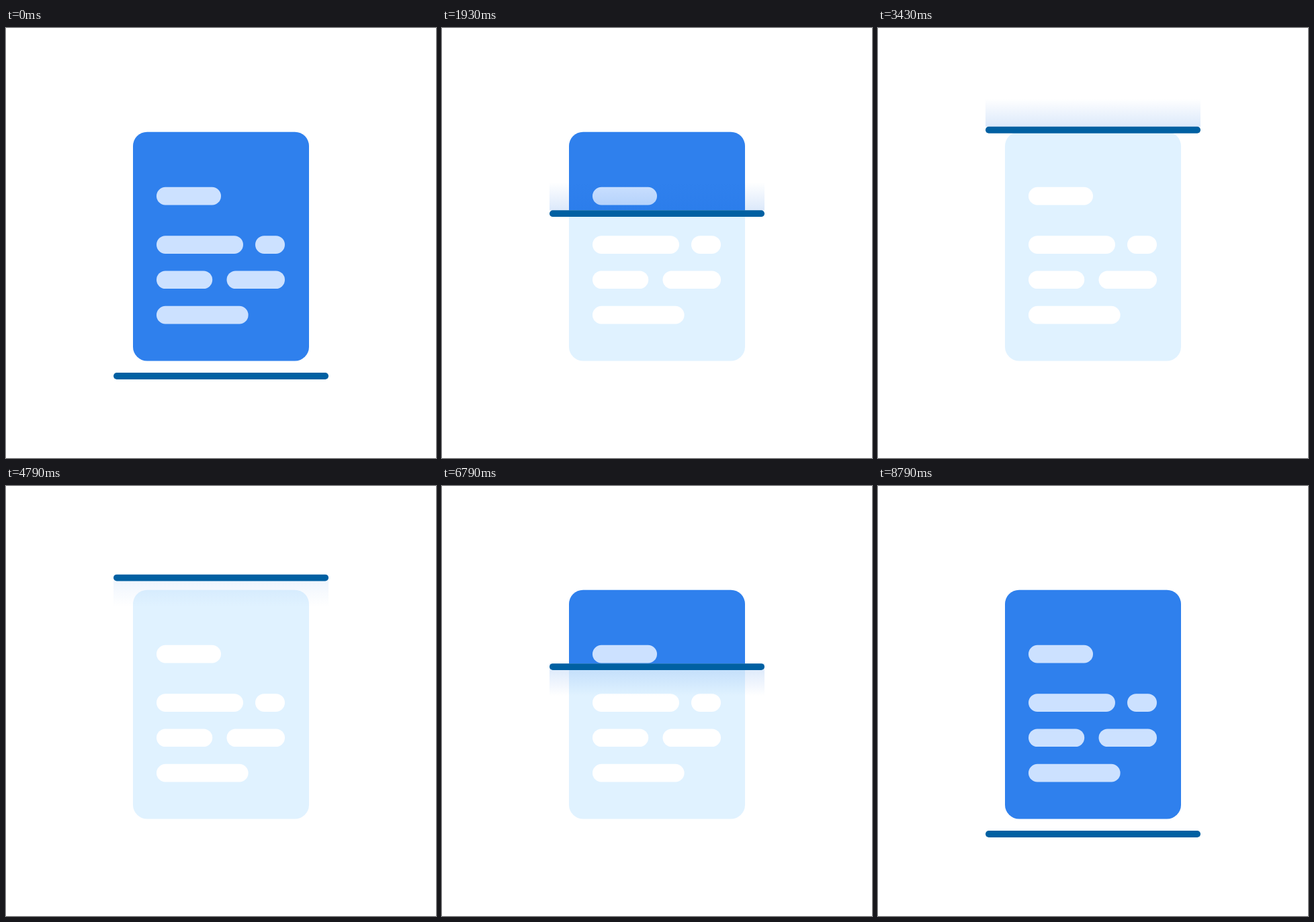
Write an HTML page with a canvas that moves like this. It is 640 px wide and 640 px high and loops after 9570 ms.

```html
<!DOCTYPE html>
<html lang="en">
<head>
<meta charset="utf-8">
<title>Document scan</title>
<style>
  html, body { margin: 0; width: 100%; height: 100%; overflow: hidden; background: #fff; }
  canvas { display: block; width: 640px; height: 640px; }
</style>
</head>
<body>
<canvas id="stage" width="640" height="640"></canvas>
<script>
const ctx = document.getElementById('stage').getContext('2d');
const LOOP = 9570, BOTTOM = 518, TRAVEL = 384;
const GLOW = '28,112,226';
const LINES = [
  [224, 236.8, 96],
  [224, 309.2, 129], [371, 309.2, 44],
  [224, 361.4, 83.2], [328.5, 361.4, 86.5],
  [224, 413.8, 136.6]
];

const clamp = v => Math.min(1, Math.max(0, v));

// Cubic bezier (.274, 0, .376, 1), solved by bisection
function ease(x) {
  if (x <= 0) return 0;
  if (x >= 1) return 1;
  let lo = 0, hi = 1, t;
  for (let i = 0; i < 30; i++) {
    t = (lo + hi) / 2;
    const u = 1 - t;
    const bx = 3 * .274 * t * u * u + 3 * .376 * t * t * u + t * t * t;
    if (bx < x) lo = t; else hi = t;
  }
  return t * t * (3 - 2 * t);
}

function pill(x, y, w, h, r, color) {
  ctx.fillStyle = color;
  ctx.beginPath();
  ctx.roundRect(x, y, w, h, r);
  ctx.fill();
}

function page(paper, ink) {
  pill(189, 154.7, 262, 340.8, 21, paper);
  for (const [x, y, w] of LINES) pill(x, y, w, 26.7, 13.35, ink);
}

function glow(edge, rising, strength) {
  const far = rising ? edge - 42 : edge + 48;
  const peak = (rising ? .155 : .175) * strength;
  const fade = ctx.createLinearGradient(0, edge, 0, far);
  fade.addColorStop(0, `rgba(${GLOW},${peak})`);
  fade.addColorStop(1, `rgba(${GLOW},0)`);
  ctx.fillStyle = fade;
  ctx.fillRect(160, Math.min(edge, far), 320, Math.abs(far - edge));
}

function draw(ms) {
  // 25 fps motion, shown at 14 pictures per second
  const shown = Math.min(133, Math.floor(ms * 14 / 1000 + .08));
  const step = Math.floor((shown + .5) * 25 / 14);
  const rising = step <= 110;
  const p = ease(rising ? step / 110 : 1 - (step - 110.6) / 109.5);
  const y = BOTTOM - TRAVEL * p;
  const edge = y - 4.8 - 1.3 * clamp((y - 290) / 90);
  const local = rising ? step : step - 110;
  const strength = clamp(Math.min(local, 110 - local) / 20);

  ctx.fillStyle = '#fff';
  ctx.fillRect(0, 0, 640, 640);
  page('#e0f2ff', '#fff');

  ctx.save();
  ctx.beginPath();
  ctx.rect(0, 0, 640, edge);
  ctx.clip();
  page('#2f80ed', '#cce1ff');
  ctx.restore();

  if (strength > 0) glow(edge, rising, strength);
  pill(160, y - 4.9, 320, 9.8, 4.9, '#0060a2');
}

const start = performance.now();
function tick() {
  draw((performance.now() - start) % LOOP);
  requestAnimationFrame(tick);
}
tick();
</script>
</body>
</html>
```
